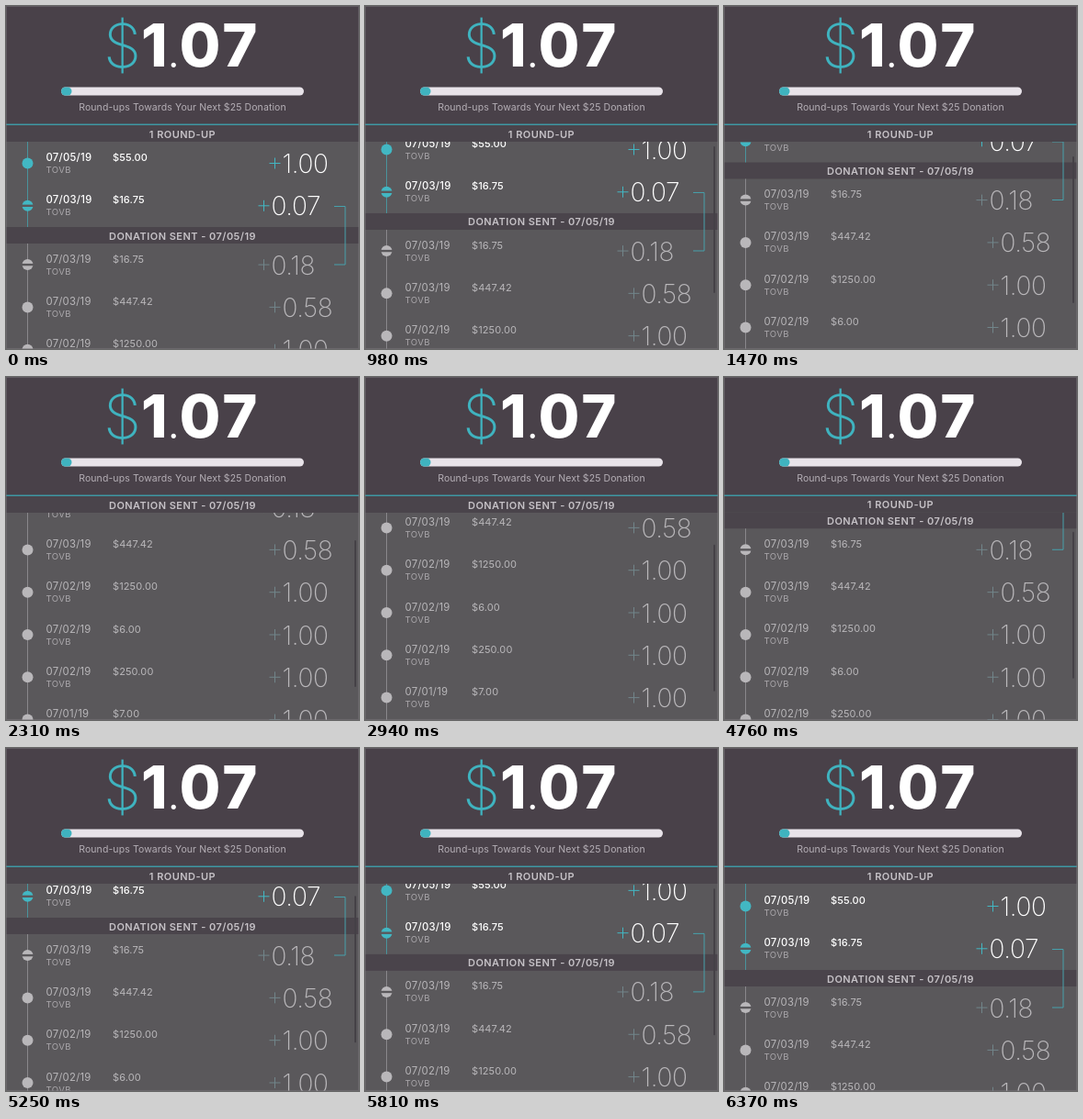
Write an HTML page that moves like this. It is 384x374 px and loops after 6440 ms.

```html
<!DOCTYPE html>
<html lang="en">
<head>
<meta charset="utf-8">
<title>Round-ups</title>
<style>
  html, body { margin: 0; width: 100%; height: 100%; overflow: hidden; background: #5a585b; }
  svg { display: block; width: 384px; height: 374px; font-family: Inter, Lato, sans-serif; }
  .sum { font-size: 65px; font-weight: 800; letter-spacing: 3px; fill: #fff; }
  .sum .dollar { font-size: 66px; font-weight: 200; fill: #3fb3bf; }
  .sum .point { font-size: 40px; font-weight: 400; }
  .caption { font-size: 10.5px; letter-spacing: .1px; fill: #b5afb6; text-anchor: middle; }
  .band rect { fill: #4a444b; }
  .band text { font-size: 11px; font-weight: 600; letter-spacing: .45px; fill: #c6c2c7; text-anchor: middle; }
  .row { fill: #b9b7ba; }
  .date { font-size: 11.3px; letter-spacing: .25px; }
  .price { font-size: 11px; letter-spacing: .1px; }
  .bank { font-size: 9.6px; letter-spacing: .4px; fill: #aaa7ab; }
  .amount { font-size: 28px; font-weight: 200; letter-spacing: -.4px; }
  .plus { stroke: #71858a; }
  .gap { fill: #5a585b; }
  .live { fill: #fff; font-weight: 500; }
  .live .bank { font-weight: 400; }
  .live .dot { fill: #42b7c3; }
  .live .plus { stroke: #42b7c3; }
  .rail { stroke: #89878b; }
  .rail.on { stroke: #4a939c; }
  .link { stroke: #46a1ac; fill: none; }
</style>
</head>
<body>
<svg viewBox="0 0 384 374">
  <defs><clipPath id="window"><rect y="148" width="384" height="226"/></clipPath></defs>
  <rect width="384" height="374" fill="#5a585b"/>

  <g class="band" id="current">
    <rect width="384" height="18"/><text x="192" y="13.5">1 ROUND-UP</text>
  </g>
  <g class="band" id="sent">
    <rect width="384" height="18"/><text x="192" y="13.5">DONATION SENT - 07/05/19</text>
  </g>

  <g clip-path="url(#window)">
    <g id="list">
      <path class="rail on" d="M23.5 140V241"/>
      <path class="rail" d="M23.5 259V640"/>
      <path class="link" d="M357 218.5H369V282H357"/>
    </g>
  </g>
  <rect id="thumb" x="379" width="2" height="160" rx="1" fill="#454147"/>

  <rect width="384" height="130" fill="#494149"/>
  <rect y="128.5" width="384" height="1.5" fill="#3e98a3"/>
  <g class="sum">
    <text class="dollar" x="106" y="67">$</text>
    <text x="147" y="66">1</text>
    <text class="point" x="176.5" y="66.5">.</text>
    <text x="188.5" y="66">07</text>
  </g>
  <rect x="60" y="88.5" width="264" height="9" rx="4.5" fill="#e8e3e9"/>
  <rect x="60" y="88.5" width="11.5" height="9" rx="4.5" fill="#3fb3bf"/>
  <text class="caption" x="192" y="114">Round-ups Towards Your Next $25 Donation</text>
  <rect x=".5" y=".5" width="383" height="373" fill="none" stroke="#7b777c" opacity=".5"/>
</svg>
<script>
const LOOP = 6440, STEP = 70, BAND = 18, TOP = 130, SENT_Y = 241;
const $ = id => document.getElementById(id);
const list = $('list'), current = $('current'), sent = $('sent'), thumb = $('thumb');

// date, price, round-up, live, split between two donations
const rows = [
  ['07/05/19', '55.00', '1.00', true, false],
  ['07/03/19', '16.75', '0.07', true, true],
  ['07/03/19', '16.75', '0.18', false, true],
  ['07/03/19', '447.42', '0.58', false, false],
  ['07/02/19', '1250.00', '1.00', false, false],
  ['07/02/19', '6.00', '1.00', false, false],
  ['07/02/19', '250.00', '1.00', false, false],
  ['07/01/19', '7.00', '1.00', false, false]
];

function rowMarkup([date, price, amount, live, split], i) {
  const y = 171.5 + i * 46.3 + (live ? 0 : BAND);
  const x = split ? 274.5 : 286.5;
  return `<g class="row ${live ? 'live' : ''}" transform="translate(0 ${y})">
    <circle class="dot" cx="23.5" r="6"/>
    ${split ? '<rect class="gap" x="17" y="-1.2" width="13" height="2.4"/>' : ''}
    <text class="date" x="43.5" y="-2.5">${date}</text>
    <text class="bank" x="43.5" y="10.5">TOVB</text>
    <text class="price" x="116" y="-2.5">$${price}</text>
    <path class="plus" d="M${x} 0h12m-6 -6v12"/>
    <text class="amount" x="${x + 14}" y="10.5">${amount}</text>
  </g>`;
}
list.insertAdjacentHTML('beforeend', rows.map(rowMarkup).join(''));

// time in ms, scroll in px, speed in px/ms
const drag = [
  [0, 0, 0], [700, 0, 0], [1470, 70.5, .095], [2310, 140, .06], [2870, 164, 0],
  [3530, 164, 0], [4270, 131, -.068], [5250, 56, -.07], [6300, -1, 0], [LOOP, -1, 0]
];

function scrollAt(t) {
  const i = drag.findIndex(key => key[0] > t);
  const [t0, a, va] = drag[i - 1], [t1, b, vb] = drag[i];
  const d = t1 - t0, u = (t - t0) / d, w = 1 - u;
  return w * w * ((1 + 2 * u) * a + u * d * va) + u * u * ((1 + 2 * w) * b - w * d * vb);
}

const moveTo = (el, y) => el.setAttribute('transform', `translate(0 ${y.toFixed(2)})`);
const clamp = v => Math.max(0, Math.min(1, v));

function draw(now) {
  const t = Math.floor((now % LOOP) / STEP) * STEP;
  const scroll = scrollAt(t);
  const sentY = Math.max(TOP, SENT_Y - scroll);
  moveTo(list, -scroll);
  moveTo(sent, sentY);
  moveTo(current, Math.min(TOP, sentY - BAND));
  moveTo(thumb, 150 + scroll * .2);
  thumb.setAttribute('opacity', clamp((t - 700) / 210) * clamp((6300 - t) / 210));
}

const start = performance.now();
function tick() {
  draw(performance.now() - start);
  requestAnimationFrame(tick);
}
tick();
</script>
</body>
</html>
```
